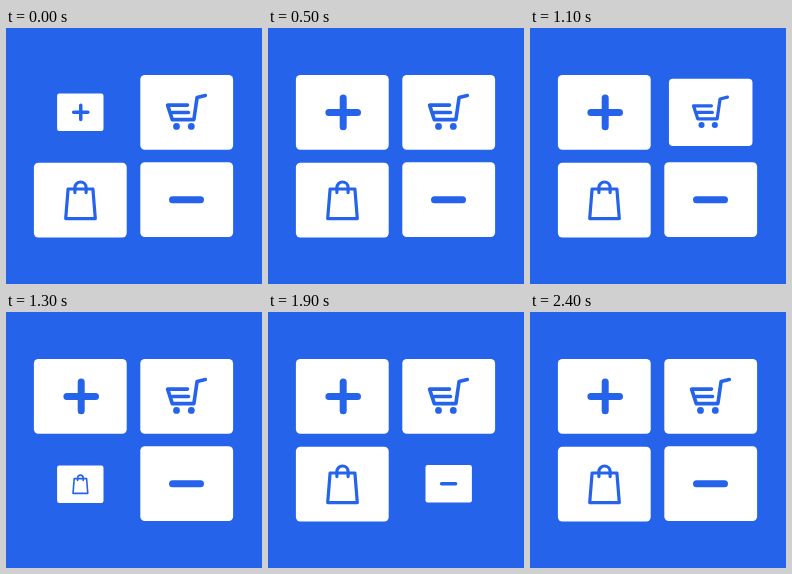
Write an HTML page that moves like this. It is 256 px wide and 256 px high and loops after 2.6 s.

```html
<!DOCTYPE html>
<html lang="en">
<head>
<meta charset="utf-8">
<title>Shop cards</title>
<style>
  html, body { margin: 0; width: 100%; height: 100%; overflow: hidden; background: #2563eb; }
  svg { display: block; width: 100vw; height: 100vh; }
  .card { fill: #fff; }
  .icon { fill: none; stroke: #2563eb; stroke-linecap: round; stroke-linejoin: round; }
  .dot { fill: #2563eb; stroke: none; }
</style>
</head>
<body>
<svg viewBox="0 0 256 256">
  <defs>
    <rect id="card" class="card" x="-46.4" y="-37.4" width="92.8" height="74.8" rx="4.5"/>
  </defs>
  <g id="plus">
    <use href="#card"/>
    <path class="icon" stroke-width="7" d="M-13.4 .1H15.2M.9 -14.2V14.4"/>
  </g>
  <g id="cart">
    <use href="#card"/>
    <g class="icon" stroke-width="3.6">
      <path d="M18.6 -16.8L10.4 -14.8L7.2 7.3H-14.4L-19.1 -7.2H.8M-14.2 .2H1.8"/>
      <circle class="dot" cx="-10.2" cy="14.1" r="3.4"/>
      <circle class="dot" cx="4.6" cy="14.1" r="3.4"/>
    </g>
  </g>
  <g id="bag">
    <use href="#card"/>
    <path class="icon" stroke-width="3.2" d="M-12.2 -11.2H12.6L15 18.4H-14.6ZM-5.4 -7.6V-12.6A5.6 5.6 0 0 1 5.8 -12.6V-7.6"/>
  </g>
  <g id="minus">
    <use href="#card"/>
    <path class="icon" stroke-width="7" d="M-14.2 .1H13.8"/>
  </g>
</svg>
<script>
  const LOOP = 2600, STEP = 100;

  // x, y: card centre; start: time at which the card is at half size
  const cards = [
    { id: 'plus',  x: 74.3,  y: 84.3,  start: 0 },
    { id: 'cart',  x: 180.7, y: 84.3,  start: 700 },
    { id: 'bag',   x: 74.3,  y: 172.2, start: 1300 },
    { id: 'minus', x: 180.7, y: 171.7, start: 1900 }
  ];
  for (const card of cards) card.node = document.getElementById(card.id);

  // Grows from 0.5 to 1 in hard steps of 0.1
  function scaleAt(t, start) {
    const step = Math.floor((t - start) / STEP);
    return step < 0 || step > 5 ? 1 : 0.5 + step * 0.1;
  }

  function draw(now) {
    const t = now % LOOP;
    for (const { node, x, y, start } of cards) {
      node.setAttribute('transform', `translate(${x} ${y}) scale(${scaleAt(t, start)})`);
    }
  }

  const begin = performance.now();
  function tick() {
    draw(performance.now() - begin);
    requestAnimationFrame(tick);
  }
  draw(0);
  requestAnimationFrame(tick);
</script>
</body>
</html>
```
